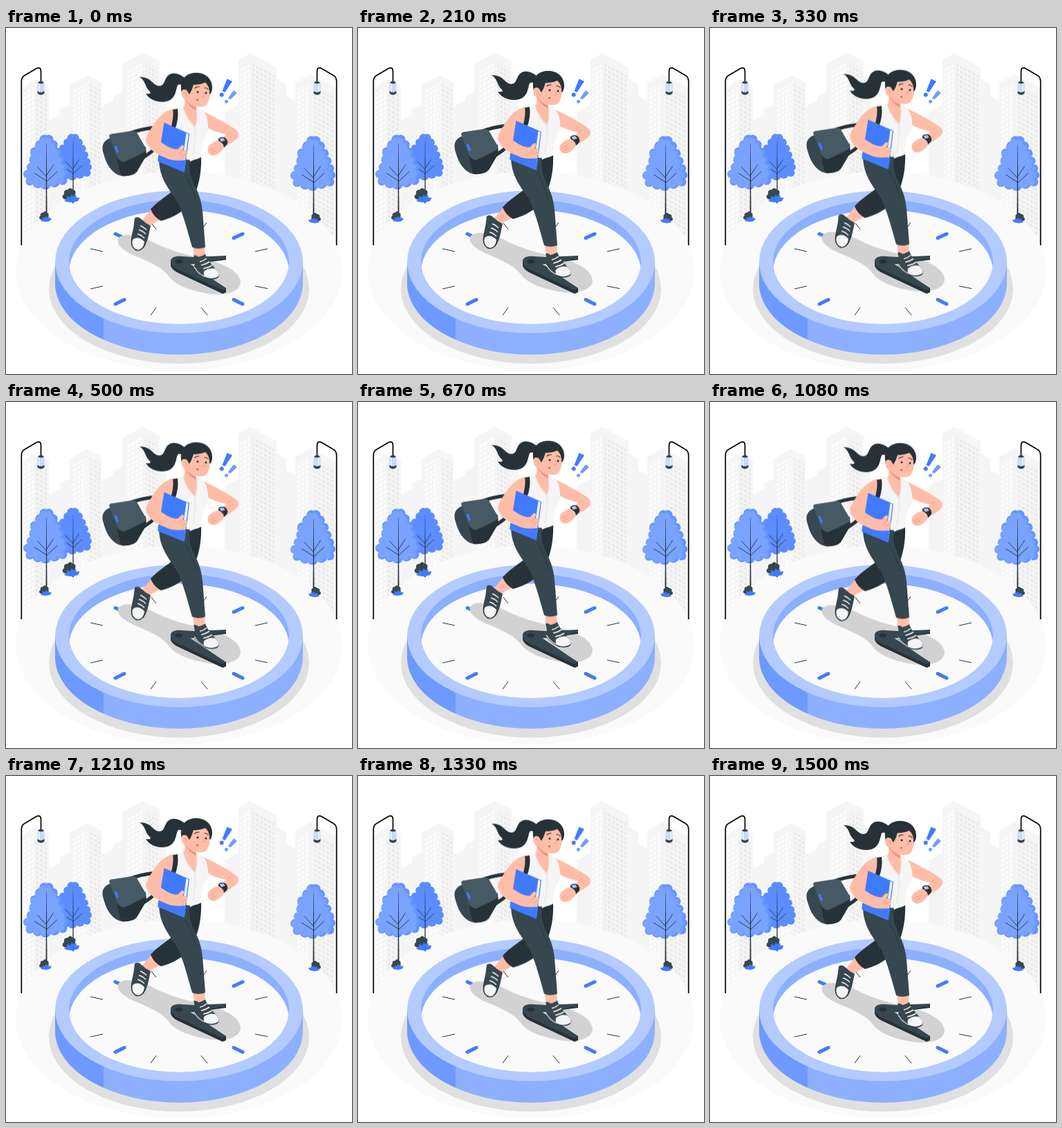
An HTML page without scripts for the animation above (1540 ms loop, 500 px wide and 500 px high).

```html
<!DOCTYPE html>
<html lang="en">
<head>
<meta charset="utf-8">
<title>Running late</title>
<style>
  html, body { margin: 0; width: 100%; height: 100%; overflow: hidden; background: #fff; }
  svg { display: block; width: 100%; height: 100%; }
  .runner { animation: float 1540ms linear infinite; }
  @keyframes float {
    0% { transform: translateY(-.3px); }
    49% { transform: translateY(-10px); }
    98% { transform: translateY(0); }
    100% { transform: translateY(-.3px); }
  }
  .ink { fill: #263238; }
  .slate { fill: #37474f; }
  .steel { fill: #455a64; }
  .blue { fill: #407bff; }
  .sky { fill: #709cff; }
  .skin { fill: #ffbda7; }
  .shirt { fill: #f5f5f5; }
  .line { fill: none; stroke: #263238; stroke-linecap: round; stroke-linejoin: round; }
  .fold { fill: none; stroke: #eb9481; stroke-width: .8; stroke-linecap: round; }
  .lace { fill: none; stroke: #f5f5f5; stroke-width: 1.6; }
</style>
</head>
<body>
<svg viewBox="0 0 500 500">
  <defs>
    <pattern id="lit" width="6" height="7" patternUnits="userSpaceOnUse" patternTransform="skewY(-28)">
      <rect x="1" y="1.5" width="4" height="4" fill="#fff"/>
    </pattern>
    <pattern id="shade" width="6" height="7" patternUnits="userSpaceOnUse" patternTransform="skewY(28)">
      <rect x="1" y="2" width="4" height="3.4" rx=".6" fill="#e8e8e8"/>
    </pattern>
    <clipPath id="well"><ellipse cx="250" cy="338" rx="159" ry="90"/></clipPath>

    <g id="lamp">
      <path d="M22.3 314V77Q22.3 71 27 68.500L43 59Q50.500 55 50.500 63V78" fill="none" stroke="#000" stroke-width="1.700"/>
      <path d="M45.500 79Q50.500 75 55.500 79V93Q50.500 98 45.500 93Z" fill="#c9daff"/>
      <path d="M48 80V94" stroke="#eaf1ff" stroke-width="2"/>
      <path class="slate" d="M46 79Q50.500 74 55 79Q50.500 82 46 79ZM45.500 91Q50.500 95 55.500 91V94.500Q50.500 99 45.500 94.500Z"/>
    </g>

    <path id="crown" d="M0-38A7 7 0 0 1 10-31A7 7 0 0 1 15-20A6 6 0 0 1 19-9A6 6 0 0 1 23 2A6 6 0 0 1 28 12A6 6 0 0 1 28 23A6 6 0 0 1 19 32A8 8 0 0 1 6 35A8 8 0 0 1-8 37A8 8 0 0 1-20 33A6 6 0 0 1-28 24A6 6 0 0 1-27 12A6 6 0 0 1-22 2A6 6 0 0 1-20-9A6 6 0 0 1-15-20A7 7 0 0 1-10-31A7 7 0 0 1 0-38Z"/>
    <g id="trunk">
      <path class="line" stroke-width=".9" d="M0 22L-13 8M0 28L-17 17M0 20L10 5M0 29L15 15"/>
      <path class="ink" d="M-.2-26H.2L1 79H-1Z"/>
    </g>
    <g id="tree">
      <use href="#crown" fill="#6695ff"/>
      <use href="#crown" fill="#79a3ff" transform="translate(-2 1) scale(.92)"/>
      <use href="#trunk"/>
    </g>

    <g id="bush">
      <path class="slate" d="M-8 2Q-12-1-8-4Q-9-9-4-9Q-1-13 2-9Q6-9 5-4L3 3Z"/>
      <path class="blue" d="M-8 4L-5 1L-4-2L-1 0L1-4L3-1L6-3L6 0L10 0L8 4Q0 7-8 4Z"/>
    </g>
  </defs>

  <!-- skyline -->
  <g fill="#f5f5f5">
    <path d="M62 134L78 126V118L92 111V320H62ZM138 114L155 105V99L168 93V300H138ZM222 70L231 75V240H222ZM316 122L336 111V240H316ZM391 73L405 82V98L418 106V300H391Z"/>
    <path d="M22 88L41 74L62 84V320H22ZM92 82L118 68L138 79V310H92ZM168 52L198 36L222 48V240H168ZM336 46L353 36L391 57V260H336ZM418 79L440 67L478 87V320H418Z"/>
  </g>
  <path fill="url(#lit)" d="M25 96L40 84V320H25ZM95 92L117 80V310H95ZM174 61L197 48V240H174ZM339 57L352 48V260H339ZM421 89L439 79V320H421Z"/>
  <path fill="url(#shade)" d="M43 86L60 95V320H43ZM121 81L136 89V310H121ZM201 49L219 58V240H201ZM356 50L388 67V260H356ZM443 80L475 97V320H443Z"/>

  <ellipse cx="250" cy="351" rx="236" ry="144" fill="#fafafa"/>

  <use href="#lamp"/>
  <use href="#lamp" transform="matrix(-1 0 0 1 500 0)"/>
  <g transform="translate(97 186) scale(.85)">
    <use href="#crown" fill="#5b8dff"/>
    <use href="#trunk"/>
  </g>
  <use href="#tree" transform="translate(58.500 193)"/>
  <use href="#tree" transform="translate(444.500 195)"/>
  <use href="#bush" transform="translate(57 275) scale(.9)"/>
  <use href="#bush" transform="translate(94 245) scale(1.250)"/>
  <use href="#bush" transform="translate(446 277) scale(-.9 .9)"/>

  <!-- clock -->
  <ellipse cx="250" cy="377" rx="188" ry="108" fill="#e0e0e0"/>
  <path d="M71 338V369A179 103 0 0 0 429 369V338Z" fill="#8cb0ff"/>
  <path d="M71 338V369A179 103 0 0 0 141 450V338Z" fill="#6e9aff"/>
  <ellipse cx="250" cy="338" rx="179" ry="103" fill="#b3cbff"/>
  <g clip-path="url(#well)">
    <rect x="90" y="245" width="320" height="185" fill="#8cb0ff"/>
    <ellipse cx="250" cy="352.500" rx="159" ry="90" fill="#fafafa"/>
  </g>
  <path d="M158 297.500L171 303.500M329 303.500L342 297.500M158 399L171 392.500M329 392.500L342 399" stroke="#407bff" stroke-width="5" stroke-linecap="round"/>
  <path d="M122 319L140 323M360 323L378 319M122 377L140 373M360 373L378 376.500M209 415L217 404M282 404L291 415M210 282L217 291M283 291L290 281" stroke="#263238"/>
  <path class="runner" d="M162 305C168 294 195 300 215 311C240 323 258 327 285 334C315 340 338 352 339 368C338 382 318 387 297 385C270 381 246 373 236 360C227 347 212 341 195 333C175 325 159 316 162 305Z" fill="#d2d2d2"/>
  <path class="ink" d="M238 337V344Q240 349 247 353L313 384L318 382V376L262 342L318 335V330Z"/>
  <path class="slate" d="M238 338C237 331 246 329 254 330L271 331L318 329V333L266 341L318 376L313 379L246 348Q239 344 238 338Z"/>
  <ellipse class="ink" cx="250" cy="337.500" rx="5.500" ry="3.200"/>

  <!-- alarm marks -->
  <path class="blue" d="M319.500 73.500L327 77L316.500 93L312.500 91Z"/>
  <circle class="blue" cx="311.700" cy="96.500" r="3"/>
  <path class="sky" d="M329 90L334 94L324 103.500L321 101Z"/>
  <circle class="sky" cx="318.500" cy="106.300" r="2.500"/>

  <g class="runner">
    <!-- bag -->
    <path class="line" stroke-width="5" stroke-linecap="butt" d="M178 153Q190 147 215 144M199 187Q210 180 218 172"/>
    <path class="slate" d="M151 159C141 163 137 170 141 182C145 197 153 211 167 214Q183 215 189 208L203 184L202 172Z"/>
    <path class="ink" d="M160 184Q162 192 170 194Q186 188 201 178L203 184L189 208Q183 215 167 214Q162 202 160 184Z"/>
    <path class="steel" d="M149 156Q150 153 155 153L181 149Q187 148 190 153L201 172Q203 177 199 180Q184 188 170 194Q161 192 158 181Z"/>
    <path class="blue" d="M156.500 172Q158 169 160 171L163 179Q162 182 160 180Z"/>

    <!-- trailing leg -->
    <path class="skin" d="M211 261L223 277L207 286L196 279Z"/>
    <path class="ink" d="M282 186C283 212 277 240 262 258C250 270 238 275 224 279Q213 273 209 262C220 250 232 243 246 232L262 195Z"/>
    <path class="slate" d="M186 275Q191 271 196 277Q202 283 209 286L206 300Q204 310 199 318Q191 325 184 318Q179 310 182 299Q185 287 186 275Z"/>
    <path class="shirt" d="M183 306Q191 300 200 309Q199 320 191 321Q180 318 183 306Z"/>
    <path class="lace" d="M194 286Q198 287 203 292M192 292Q197 293 202 298M190 298Q195 299 200 304"/>
    <path class="line" stroke-width="1.100" d="M182 304Q179 316 188 321.500Q196 323 201 313"/>

    <!-- leading leg -->
    <path class="skin" d="M270 315H287L288 332Q279 337 272 331Z"/>
    <path class="slate" d="M271 329Q275 328 278 331Q283 330 288 327Q290 333 294 338L305 351Q309 356 307 360Q300 366 288 361Q276 355 272 345Q274 338 271 329Z"/>
    <path class="shirt" d="M286 352Q293 346 302 348Q309 354 307 359Q300 364 290 361Q284 359 286 352Z"/>
    <path class="lace" d="M280 338Q285 337 290 333M282 343Q288 342 294 338M285 348Q292 347 298 343M272 346Q277 355 287 360"/>
    <path class="line" stroke-width="1" d="M271.500 347Q278 357 290 362Q301 365 307 360"/>
    <path class="slate" d="M221 188L266 190C264 205 267 217 274 231C282 246 284 260 285 278L288 317Q278 321 269 317C263 296 257 272 248 252C236 233 221 218 221 188Z"/>
    <path class="line" stroke-width=".8" d="M259 212C266 225 272 236 274 250M284 281Q285 287 280 292"/>

    <!-- right arm -->
    <path class="skin" d="M277 117C294 125 318 137 332 147Q338 152 335 158C331 164 321 168 315 173C311 180 303 186 297 184C291 182 290 175 293 171Q298 165 307 163L319 154C306 152 292 146 285 140Z"/>
    <path class="fold" d="M319 154L324 150M295 177L301 174M297 181L304 177"/>
    <path class="ink" d="M307 160Q313 156 318 160Q322 165 319 169L315 173Q315 167 307 163Z"/>
    <path d="M307.500 160L314 158.500L317.500 163L311 165Z" fill="#a9c4ff" stroke="#263238"/>

    <!-- torso -->
    <path class="shirt" d="M246 117L259 112L275 114Q287 119 290 129C293 142 294 150 287 159Q282 169 282 187Q270 194 255 189L247 166Z"/>
    <path class="skin" d="M257 98L275 105L275 118Q277 131 273 143Q262 132 256 116Q260 110 257 98Z"/>
    <path d="M256 115Q261 133 273 145Q277 135 276 117M273 145Q274 162 270 184" fill="none" stroke="#e2e2e2"/>
    <path class="ink" d="M241 118L248 117Q250 132 244 147L234 147Q241 132 241 118Z"/>

    <!-- ponytail and head -->
    <path class="ink" d="M258 72C250 65 239 63 233 70C228 77 229 83 222 84C212 84 211 71 193 71C202 76 201 87 208 92Q211 96 202 95C208 105 222 109 233 106C246 102 245 90 248 83Q250 80 256 84Z"/>
    <path class="skin" d="M263 78L293 76C296 88 296 103 290 111C283 118 270 113 264 106Q258 106 256 101L254 92Z"/>
    <path d="M259 103Q266 112 275 115L274 119Q264 114 259 103Z" fill="#eb9481"/>
    <path class="ink" d="M254 94C250 78 257 66 273 65C289 64 299 75 298 88Q297 95 294 96Q295 85 288 79Q280 83 271 82Q269 90 265 96Q262 93 261 90Z"/>
    <path class="skin" d="M262 91Q257 87 254 91Q252 99 258 103Q263 104 265 98Z"/>
    <path class="fold" d="M257 93Q261 94 261 99M285 93L287 99L283 100"/>
    <path class="line" stroke-width="1.200" d="M273 87Q275 85 279 85M287 87Q290 86 292 89"/>
    <circle class="ink" cx="277" cy="92.700" r="1.500"/>
    <circle class="ink" cx="289" cy="94" r="1.500"/>
    <ellipse cx="276.500" cy="104" rx="1.200" ry="1.300" fill="#a3493f"/>

    <!-- book and left arm -->
    <path class="skin" d="M241 117C226 121 217 133 210 145C203 155 199 163 206 170L223 181L238 146Q243 128 241 117Z"/>
    <path class="blue" d="M228.500 137L265 153L258 208.500L219.500 193Z"/>
    <path class="shirt" d="M260.500 152L263.800 153.500L257 205L253.500 203Z"/>
    <path class="skin" d="M204 163C212 160 221 163 228 168C237 174 243 176 249 175Q254 168 257 170Q258 173 255 177L261 177Q263 184 258 190C250 196 240 193 231 188C219 183 204 176 204 163Z"/>
    <path class="blue" d="M220 184Q238 194 259 191L257 208.500L219.500 193Z"/>
    <path class="fold" d="M255 177L251 181M261 182L255 185"/>
  </g>
</svg>
</body>
</html>
```
